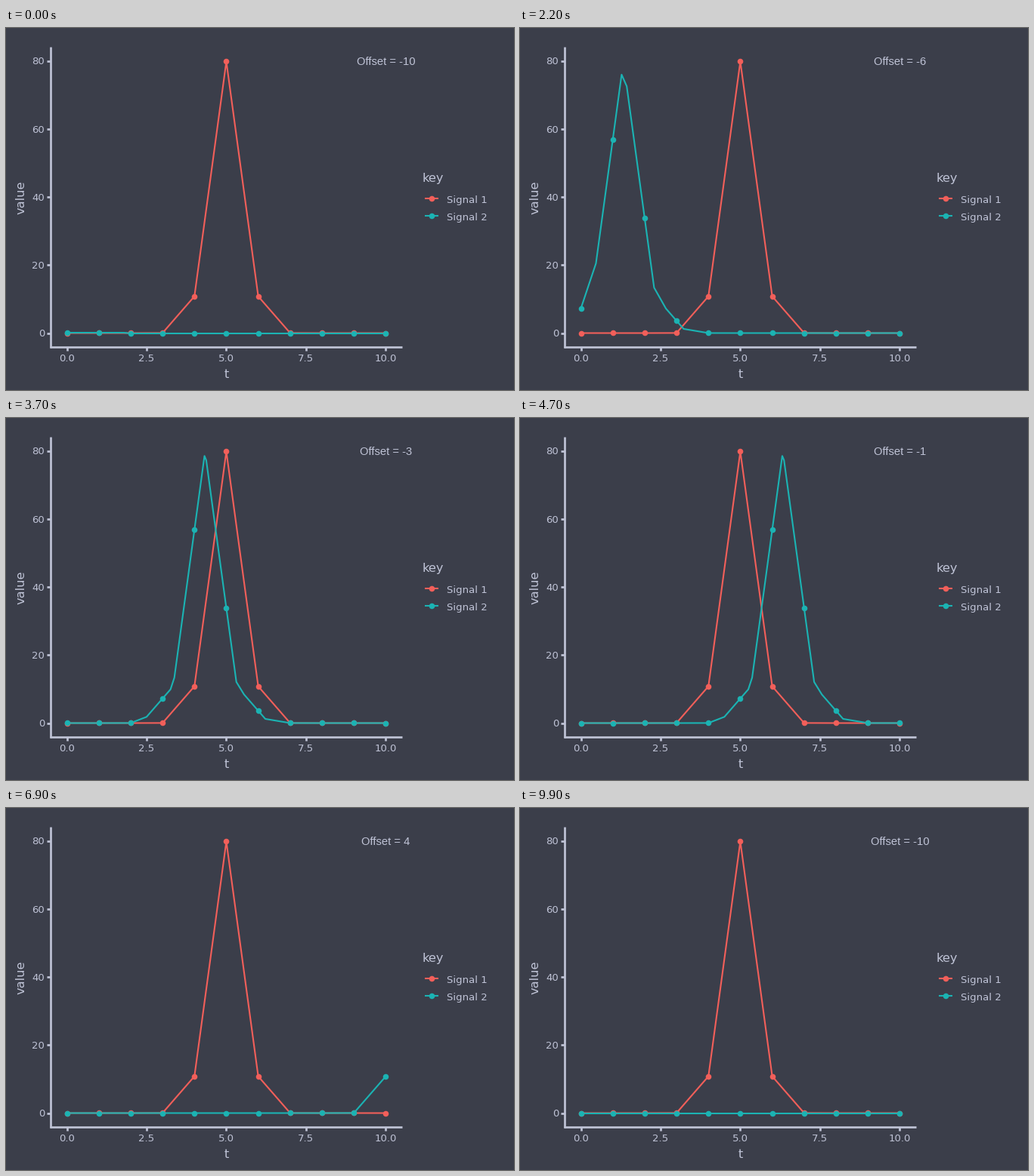
A matplotlib script that plays this animation: 672 px wide and 480 px high, repeating every 10000 ms.

```python
import numpy as np
import matplotlib.pyplot as plt
from matplotlib.animation import FuncAnimation
from matplotlib.patches import Rectangle

DPI = 96
W, H = 672, 480
PX = 72 / DPI  # points per pixel

BACK, INK = "#3b3e4a", "#bfc3d6"
RED, TEAL = "#f25f5a", "#1bb3b3"

LEFT, RIGHT, TOP, BOTTOM = 59.4, 523.5, 26.3, 422.5
X0, X_UNIT = 80.5, 42.19
Y0, Y_UNIT = 404.5, 4.512

T = np.arange(11)
EXTRA = 39  # points inserted into a path before it is morphed

# Frame on which each offset is reached, and the steps taken to get there.
ENDS = [5 * k - 1 for k in range(1, 17)] + [84, 88, 92, 96, 100]
STEPS = [3] * len(ENDS)
ENDS[12], STEPS[12] = 65, 4


def px(x):
    return X0 + X_UNIT * np.asarray(x, float)


def py(y):
    return Y0 - Y_UNIT * np.asarray(y, float)


def signal(center):
    return 100 / (0.5 * np.sqrt(2 * np.pi)) * np.exp(-2 * (T - center) ** 2)


def split_counts(lengths):
    """Share the extra points among the edges in proportion to length."""
    share = lengths / lengths.sum()
    n = float(EXTRA)
    counts = np.round(share * n).astype(int)
    while counts.sum() < EXTRA:
        n += 0.02
        counts = np.round(share * n).astype(int)
    left = EXTRA
    for i, count in enumerate(counts):
        counts[i] = min(count, left)
        left -= counts[i]
    return counts


def dense_path(center):
    y = signal(center)
    lengths = np.round(np.hypot(1, np.diff(y)), 6)
    pieces = split_counts(lengths) + 1
    x = np.concatenate([i + np.arange(n) / n for i, n in enumerate(pieces)] + [[10]])
    return x, np.interp(x, T, y)


def state_at(frame):
    """Offset index reached, and progress towards the next one."""
    k = sum(end <= frame for end in ENDS)
    start = ENDS[k] - STEPS[k]
    return k, max(0, (frame - start) / STEPS[k])


def mix(a, b, p):
    return (1 - p) * a + p * b


fig = plt.figure(figsize=(W / DPI, H / DPI), dpi=DPI, facecolor=BACK)
ax = fig.add_axes([0, 0, 1, 1])
ax.set_xlim(0, W)
ax.set_ylim(H, 0)
ax.axis("off")


def stroke(xs, ys, color, width, z):
    return ax.plot(xs, ys, color=color, lw=width * PX, zorder=z,
                   solid_capstyle="butt", solid_joinstyle="round")[0]


def dots(xs, ys, color, z):
    return ax.plot(xs, ys, "o", color=color, ms=7.6 * PX, mew=0, zorder=z)[0]


def write(x, y, text, size, ha="center", va="baseline", font="DejaVu Sans", **kw):
    return ax.text(x, y, text, fontsize=size * PX, color=INK, ha=ha, va=va,
                   family=font, **kw)


# Axes
stroke([LEFT, LEFT], [TOP - 1, BOTTOM + 1.3], INK, 2.7, 1)
stroke([LEFT - 1.3, RIGHT + 0.5], [BOTTOM, BOTTOM], INK, 2.7, 1)
for v in range(0, 81, 20):
    stroke([LEFT - 5.5, LEFT], [py(v)] * 2, INK, 2.7, 1)
    write(51.3, py(v) + 4.9, str(v), 13.3, ha="right")
for v in (0, 2.5, 5, 7.5, 10):
    stroke([px(v)] * 2, [BOTTOM, BOTTOM + 5.5], INK, 2.7, 1)
    write(px(v), 442, f"{v:.1f}", 13.3)
write(291.4, 464, "t", 16.2)
write(20, 225, "value", 16.2, va="center", rotation=90)

# Legend
write(550, 204, "key", 16.2, ha="left")
for y, color, name in ((226.3, RED, "Signal 1"), (249.4, TEAL, "Signal 2")):
    stroke([554, 572], [y, y], color, 2.1, 3)
    dots([563], [y], color, 4)
    write(583, y + 5.4, name, 13.3, ha="left")

# Data
stroke(px(T), py(signal(5)), RED, 2.1, 3)
dots(px(T), py(signal(5)), RED, 5)
line = stroke([], [], TEAL, 2.1, 4)
points = dots([], [], TEAL, 6)
label = write(px(10), 48.9, "", 14.7, font="Liberation Sans", zorder=7)
label.set_clip_path(Rectangle((LEFT, TOP), RIGHT - LEFT, BOTTOM - TOP,
                              transform=ax.transData))


def update(frame):
    k, p = state_at(frame)
    center = k - 3
    (xa, ya), (xb, yb) = dense_path(center), dense_path(center + 1)
    line.set_data(px(mix(xa, xb, p)), py(mix(ya, yb, p)))
    points.set_data(px(T), py(mix(signal(center), signal(center + 1), p)))
    shown = (k + (p >= 0.5)) % 21
    label.set_text(f"Offset = {shown - 10}")
    return line, points, label


anim = FuncAnimation(fig, update, frames=100, interval=100, repeat=True,
                     repeat_delay=0, blit=False)
plt.show()
```
